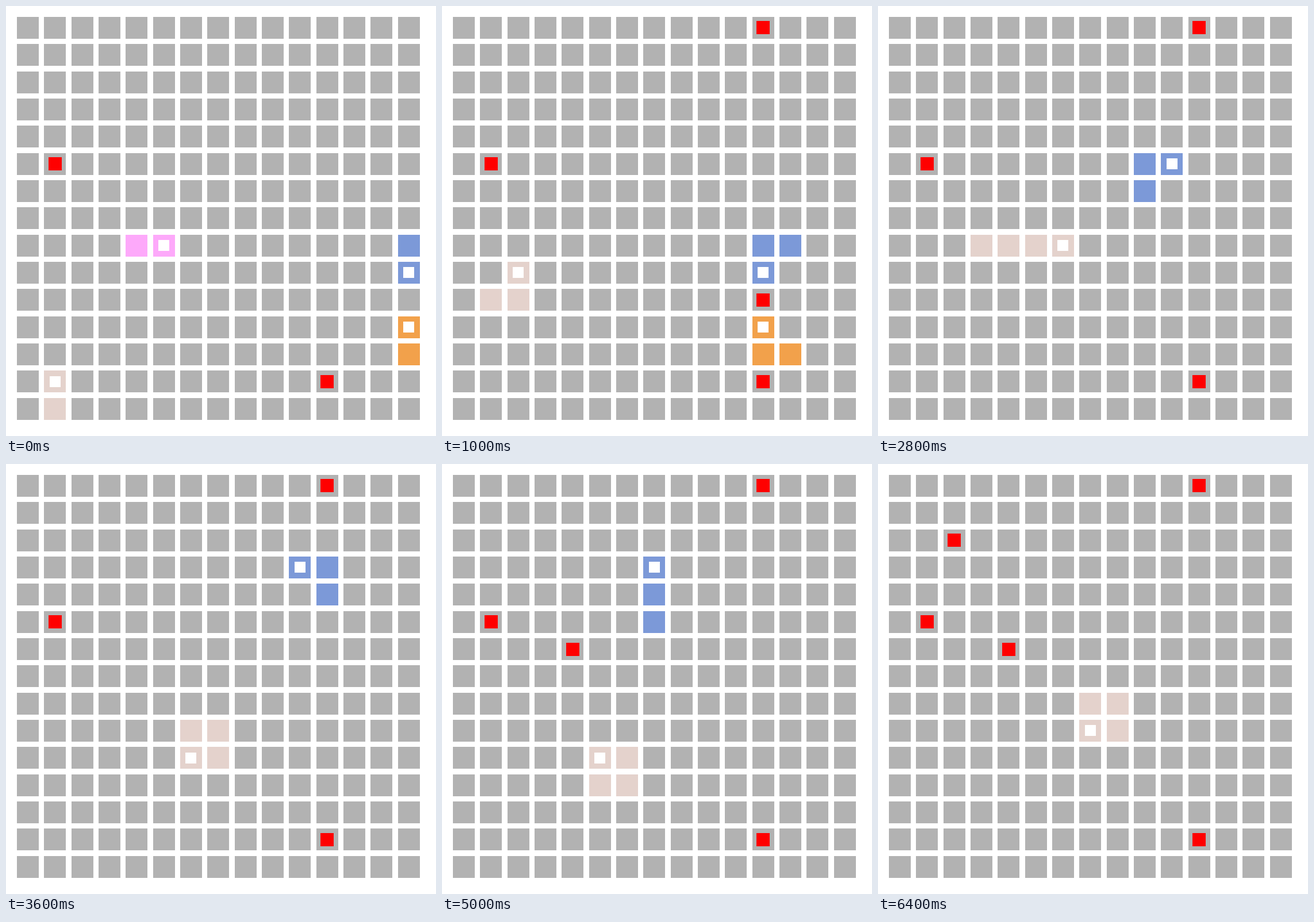
Recreate the animation shown at these times as an HTML page with a canvas. Size 748 px wide and 748 px high, loop 6600 ms.

```html
<!DOCTYPE html>
<html lang="en">
<head>
<meta charset="utf-8">
<title>Snakes on a grid</title>
<style>
  html, body { margin: 0; width: 100%; height: 100%; overflow: hidden; background: #fff; }
  canvas { display: block; }
</style>
</head>
<body>
<canvas id="stage" width="748" height="748"></canvas>
<script>
const ctx = document.getElementById('stage').getContext('2d');
const CELLS = 15, PITCH = 748 / 15.8, STEP = 200, STEPS = 33;
const MOVES = { U: [0, -1], D: [0, 1], L: [-1, 0], R: [1, 0] };

// A snake vanishes once its moves run out; it grows by one cell at step `eats`.
const snakes = [
  { color: '#fda9fa', start: [4, 8], moves: 'RR' },
  { color: '#7c99d8', start: [14, 8], moves: 'DLLULDLURUULLURRUULDLDLLUURRDDL' },
  { color: '#f2a14b', start: [14, 12], moves: 'ULLDLURULU', eats: 8 },
  { color: '#e4d2cc', start: [1, 14], moves: 'UUUURURDRULURRRDRDLURDLDLURURURDL', eats: 11 },
];

for (const snake of snakes) {
  snake.path = [snake.start];
  for (const move of snake.moves) {
    const [x, y] = snake.path.at(-1), [dx, dy] = MOVES[move];
    snake.path.push([x + dx, y + dy]);
  }
}

const food = [
  { cell: [1, 5], from: 0 },
  { cell: [11, 13], from: 0 },
  { cell: [11, 0], from: 2 },
  { cell: [11, 10], from: 4, until: 8 },
  { cell: [3, 8], from: 7, until: 11 },
  { cell: [4, 6], from: 20 },
  { cell: [2, 2], from: 26 },
];

// Square centred on a grid cell, snapped to whole pixels; size is in pitches.
function square([col, row], size, color) {
  const edge = i => Math.round((i + 0.8 - size / 2) * PITCH - 0.02);
  const side = Math.round(size * PITCH);
  ctx.fillStyle = color;
  ctx.fillRect(edge(col), edge(row), side, side);
}

function draw(step) {
  ctx.fillStyle = '#fff';
  ctx.fillRect(0, 0, 748, 748);
  for (let i = 0; i < CELLS * CELLS; i++) {
    square([i % CELLS, Math.floor(i / CELLS)], 0.8, '#b2b2b2');
  }
  for (const { cell, from, until = STEPS } of food) {
    if (step >= from && step < until) square(cell, 0.48, '#f00');
  }
  for (const { color, path, moves, eats = STEPS } of snakes) {
    if (step >= moves.length) continue;
    const head = step + 1, length = step >= eats ? 4 : 3;
    const body = path.slice(Math.max(0, head - length + 1), head + 1);
    body.forEach(cell => square(cell, 0.8, color));
    square(path[head], 0.4, '#fff');
  }
}

function tick() {
  draw(Math.floor(performance.now() / STEP) % STEPS);
  requestAnimationFrame(tick);
}
tick();
</script>
</body>
</html>
```
